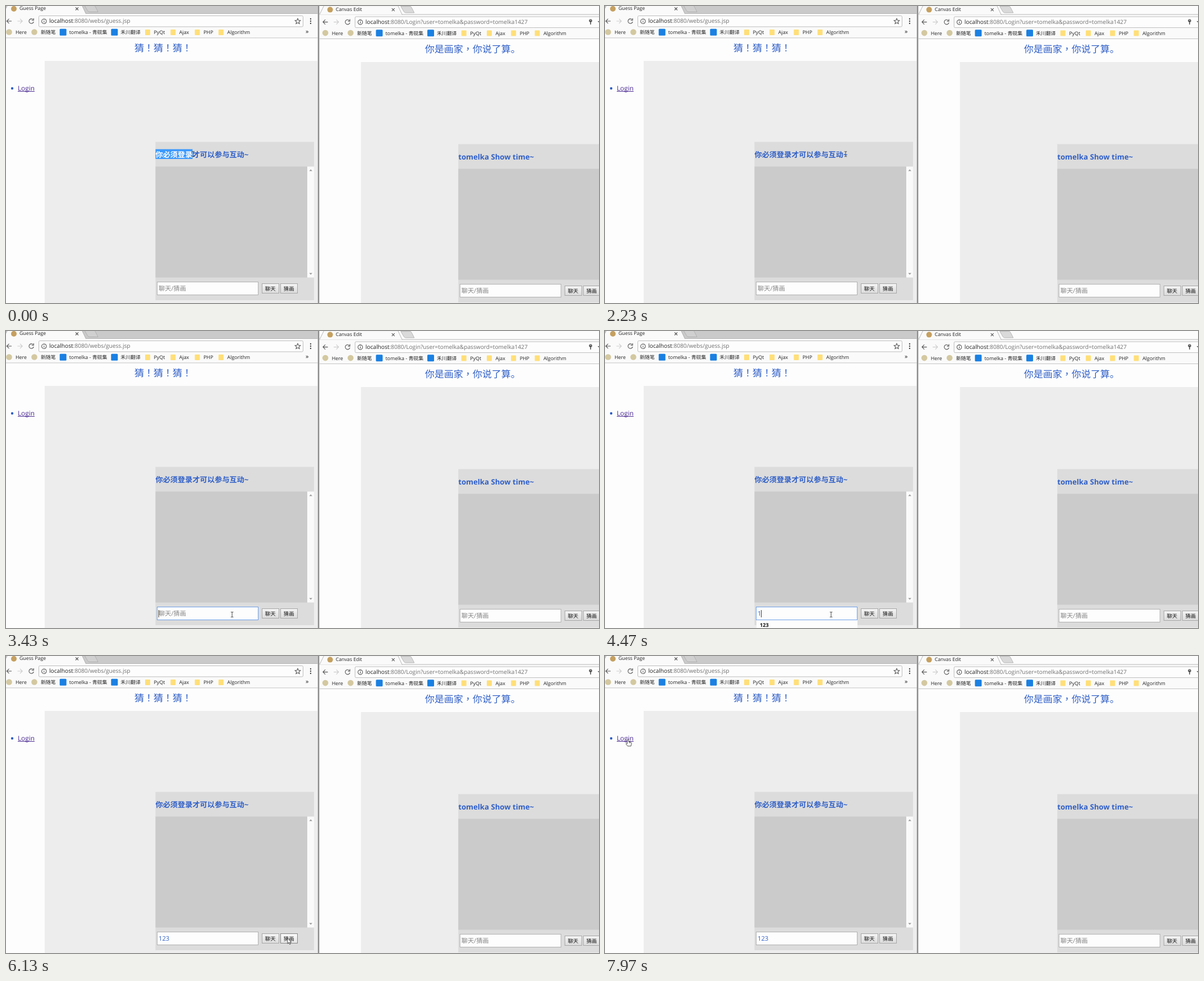
Write an HTML page that moves like this. It is 1057 px wide and 530 px high and loops after 8000 ms.

```html
<!DOCTYPE html>
<html lang="zh-CN">
<head>
<meta charset="utf-8">
<title>Guess Page</title>
<style>
html, body { margin: 0; width: 100%; height: 100%; overflow: hidden; background: #fdfdfd; }
svg { display: block; width: 1057px; height: 530px; }
text { font-family: 'Open Sans', 'Noto Sans CJK SC', 'Noto Sans CJK', sans-serif; white-space: pre; text-rendering: geometricPrecision; }
.line { fill: none; stroke: #555; stroke-width: 1.1; }
.button rect { fill: url(#face); stroke: #a6a6a6; }
.button.hover rect { fill: url(#lit); stroke: #858585; }
.button.down rect { fill: url(#sunk); stroke: #858585; }
</style>
</head>
<body>
<svg id="stage" viewBox="0 0 1057 530"></svg>
<script>
const BLUE = '#2f5fc8';
const LOOP = 8000;
const CHAR = 13.2;
const NOTICE = '你必须登录才可以参与互动~';

const rect = (x, y, w, h, fill, more = '') =>
  `<rect x="${x}" y="${y}" width="${w}" height="${h}" fill="${fill}" ${more}/>`;
const text = (x, y, size, str, fill = '#222', more = '') =>
  `<text x="${x}" y="${y}" font-size="${size}" fill="${fill}" ${more}>${str}</text>`;
const path = (d, more = 'class="line"') => `<path d="${d}" ${more}/>`;
const dot = (x, y, r, fill) => `<circle cx="${x}" cy="${y}" r="${r}" fill="${fill}"/>`;
const gradient = (id, top, bottom) =>
  `<linearGradient id="${id}" x2="0" y2="1"><stop stop-color="${top}"/><stop offset="1" stop-color="${bottom}"/></linearGradient>`;
// Traditional locale centres full-width punctuation in its cell
const centred = str => `<tspan lang="zh-TW">${str}</tspan>`;

const bookmarks = [
  [17, 'Here'], [62, '新随笔'], [112.7, 'tomelka - 青砚集'], [204.3, '禾川翻译'],
  [263.5, 'PyQt'], [308.8, 'Ajax'], [352, 'PHP'], [394.3, 'Algorithm']
];

function bookmark([x, label], i) {
  const icon = i < 2 ? dot(x - 11.5, 46.5, 5.3, '#d3c8a0')
    : i < 4 ? rect(x - 17, 40.7, 12, 12, '#1a80e2', 'rx="1.5"')
    : rect(x - 15.5, 42, 9, 10, '#ffdf78', 'rx="1"');
  return icon + text(x, 50.2, 8.9, label);
}

function browser(dx, dy, title, rest, strip, stub) {
  return `<g transform="translate(${dx} ${dy})">` +
    rect(-5, -2, 561, 16, strip) +
    rect(-5, 14, 561, 43, '#fafafa') +
    path('M-5 13.5H556', 'stroke="#b5b5b5"') +
    path('M-5 14L3 -2H135L142.5 14', 'fill="#fafafa" stroke="#a5a5a5" stroke-width=".8"') +
    path('M140 -1H157.5Q159 0 164 10.5H149Q146.5 10.5 145.5 8.5Z', `fill="${stub}" stroke="#aaa" stroke-width=".8"`) +
    dot(14, 5, 5, '#c5a060') + text(24, 7.4, 8.75, title) +
    path('M124 2.5L129 7.5M129 2.5L124 7.5') +
    path('M10 27H1.5M5.5 22.8L1.3 27L5.5 31.2') +
    path('M20.5 27H29M25 22.8L29.2 27L25 31.2', 'class="line" style="stroke:#ccc"') +
    path('M48.3 24.2A4.2 4.2 0 1 0 49.3 28M49.3 22V25.5H45.8') +
    rect(58.5, 17.5, 471, 19.5, '#fdfdfd', 'stroke="#bcbcbc" rx="2"') +
    path('M72 27.2A4.2 4.2 0 1 0 72 27.3M67.8 26.5V29.5M67.8 24.6V25.6') +
    text(77, 30.4, 10.2, `localhost<tspan fill="#707070">${rest}</tspan>`) +
    path('M520 22.3L521.4 25.6L524.8 25.9L522.2 28.2L523 31.6L520 29.8L517 31.6L517.8 28.2L515.2 25.9L518.6 25.6Z') +
    [23, 27, 31].map(y => dot(543, y, 1.2, '#444')).join('') +
    bookmarks.map(bookmark).join('') +
    text(534, 49, 11, '»') +
    path('M-5 56.9H556', 'stroke="#c4c4c4"') + '</g>';
}

const button = (x, label, id) =>
  `<g class="button" id="${id}">${rect(x, 495.5, 30, 17, '')}${text(x + 5.3, 507.9, 9.4, label, '#111')}</g>`;

// Chat panel: heading bar, message list, input and two buttons
function panel(dx, dy, heading, side) {
  return `<g transform="translate(${dx} ${dy})">` +
    rect(266.5, 242.5, 282.5, 282.5, '#dcdcdc') +
    text(266.5, 270, CHAR, heading, BLUE, 'font-weight="700"') +
    rect(266.5, 286.5, 270.5, 198, '#cbcbcb') +
    rect(537, 286.5, 12, 198, '#fafafa') +
    path('M540.5 294.5L543.2 291.5L546 294.5ZM540.5 476.5L543.2 479.5L546 476.5Z', 'fill="#999"') +
    rect(269.5, 492.5, 180, 23, '#fdfdfd', `id="box${side}" stroke="#b0b0b0"`) +
    text(272, 508.2, 11.2, '聊天/猜画', '#858585', `id="value${side}"`) +
    button(456.5, '聊天', 'chat' + side) + button(489.5, '猜画', 'guess' + side) + '</g>';
}

const stage = document.getElementById('stage');
stage.innerHTML =
  '<defs>' + gradient('face', '#f5f5f5', '#dcdcdc') + gradient('lit', '#fafafa', '#e6e6e6') +
  gradient('sunk', '#d6d6d6', '#efefef') + '</defs>' +
  rect(0, 0, 1057, 530, '#fdfdfd') +
  rect(69, 98, 486.5, 432, '#ededed') +
  rect(632.7, 100, 425, 430, '#ededed') +
  browser(0, 0, 'Guess Page', ':8080/webs/guess.jsp', '#cacaca', '#d0d0d0') +
  browser(563.7, 1.6, 'Canvas Edit', ':8080/Login?user=tomelka&amp;password=tomelka1427', '#fcfcfc', '#dadada') +
  rect(1034, 20.5, 23, 16, '#fdfdfd') +
  dot(1042, 26.3, 2.7, '#555') + dot(1042, 25.5, 0.8, '#fdfdfd') + rect(1041.2, 28, 1.6, 5, '#555') +
  path('M1054.5 27H1057V29.5Z', 'fill="#555"') +
  rect(555.5, 0, 3.5, 530, '#d2d2d2') + rect(556, 0, 2, 530, '#8c8c8c') +
  text(229, 81.2, 17, centred('猜！猜！猜！'), BLUE) +
  text(746.7, 83, 17, `你是画家${centred('，')}你说了算。`, BLUE) +
  dot(11, 147, 2.2, BLUE) +
  text(21, 151, 11.8, 'Login', '#4b2a92') + rect(21, 152, 30, 1, '#4b2a92') +
  panel(0, 0, NOTICE, 'L') +
  panel(539.7, 4, 'tomelka Show time~', 'R') +
  rect(266.5, 255.5, 0, 17.5, '#3b99fd', 'id="mark"') +
  text(266.5, 270, CHAR, '', '#fff', 'id="marked" font-weight="700"') +
  `<g id="hint">${rect(270, 516, 180, 15, '#fdfdfd')}${text(276, 528.2, 9.2, '123', '#111', 'font-weight="700"')}</g>` +
  rect(271.7, 498, 1, 13, '#333', 'id="caret"') +
  '<g id="pointer">' +
  path('M0 0V9.6L2.2 7.6L3.7 10.9L5.3 10.2L3.8 7H6.8Z', 'id="arrow" fill="#fff" stroke="#222" stroke-width=".8"') +
  path('M-2.2 -4.5H-.8L0 -4L.8 -4.5H2.2M0 -4V4M-2.2 4.5H-.8L0 4L.8 4.5H2.2', 'id="beam" fill="none" stroke="#333" stroke-width=".9"') +
  path('M-1.2 7V.6Q0 -.8 1.2 .6V4.6L5 5.5Q6.3 6 6.2 8L5.2 12.3H-.6L-3.8 8Q-3.5 6.3 -1.2 8ZM3 5.3V7.3', 'id="hand" fill="#fff" stroke="#222" stroke-width=".8"') +
  '</g>';

const el = id => document.getElementById(id);
const show = (id, on) => { el(id).style.display = on ? '' : 'none'; };
const within = ([x, y], x0, y0, x1, y1) => x >= x0 && x <= x1 && y >= y0 && y <= y1;

// Pointer stops: time, x, y
const route = [
  [0, 334, 264], [30, 334, 264], [650, 430, 264.5], [2230, 430, 264.5],
  [2510, 128, 183], [2930, 459, 521], [3030, 475, 515], [3060, 475, 515],
  [3430, 403, 506], [4770, 403, 506], [5080, 508, 503], [5300, 480, 501],
  [5780, 480, 501], [6180, 505, 504], [6890, 505, 504], [6990, 417, 469],
  [7360, 62, 235], [7640, 42, 150], [7920, 42, 150], [7970, 41, 148.5], [LOOP, 41, 148.5]
];

function pointerAt(t) {
  const i = route.findIndex(stop => stop[0] > t);
  const [t0, x0, y0] = route[i - 1], [t1, x1, y1] = route[i];
  const k = (t - t0) / (t1 - t0);
  return [x0 + (x1 - x0) * k, y0 + (y1 - y0) * k];
}

function draw(t) {
  const p = pointerAt(t);
  el('pointer').setAttribute('transform', `translate(${p})`);
  const beam = within(p, 266, 256, 436, 274) || within(p, 270, 493, 449, 515.5);
  const hand = within(p, 21, 140, 51, 154);
  show('beam', beam);
  show('hand', hand);
  show('arrow', !beam && !hand);

  const picked = t < 2230 ? Math.round((p[0] - 266.5) / CHAR) : 0;
  el('mark').setAttribute('width', picked * CHAR);
  el('marked').textContent = NOTICE.slice(0, picked);

  const typed = [4470, 4530, 4770].filter(at => t >= at).length;
  el('valueL').textContent = typed ? '123'.slice(0, typed) : '聊天/猜画';
  el('valueL').setAttribute('fill', typed ? BLUE : '#858585');
  const focus = t >= 3430 && t < 5550;
  el('boxL').setAttribute('stroke', focus ? '#6d9fe8' : '#b0b0b0');
  show('hint', typed && focus);
  show('caret', focus && (t < 3950 || t >= 4470 && t < 5300));
  el('caret').setAttribute('x', 271.7 + typed * 6.4);

  const down = [[5550, 5660], [6330, 6450], [6620, 6740]].some(([a, b]) => t >= a && t < b);
  for (const [id, x] of [['chatL', 456], ['guessL', 489]]) {
    const over = within(p, x, 495, x + 31, 513);
    el(id).classList.toggle('hover', over);
    el(id).classList.toggle('down', over && down);
  }
}

const start = performance.now();
function tick() {
  draw((performance.now() - start) % LOOP);
  requestAnimationFrame(tick);
}
tick();
</script>
</body>
</html>
```
